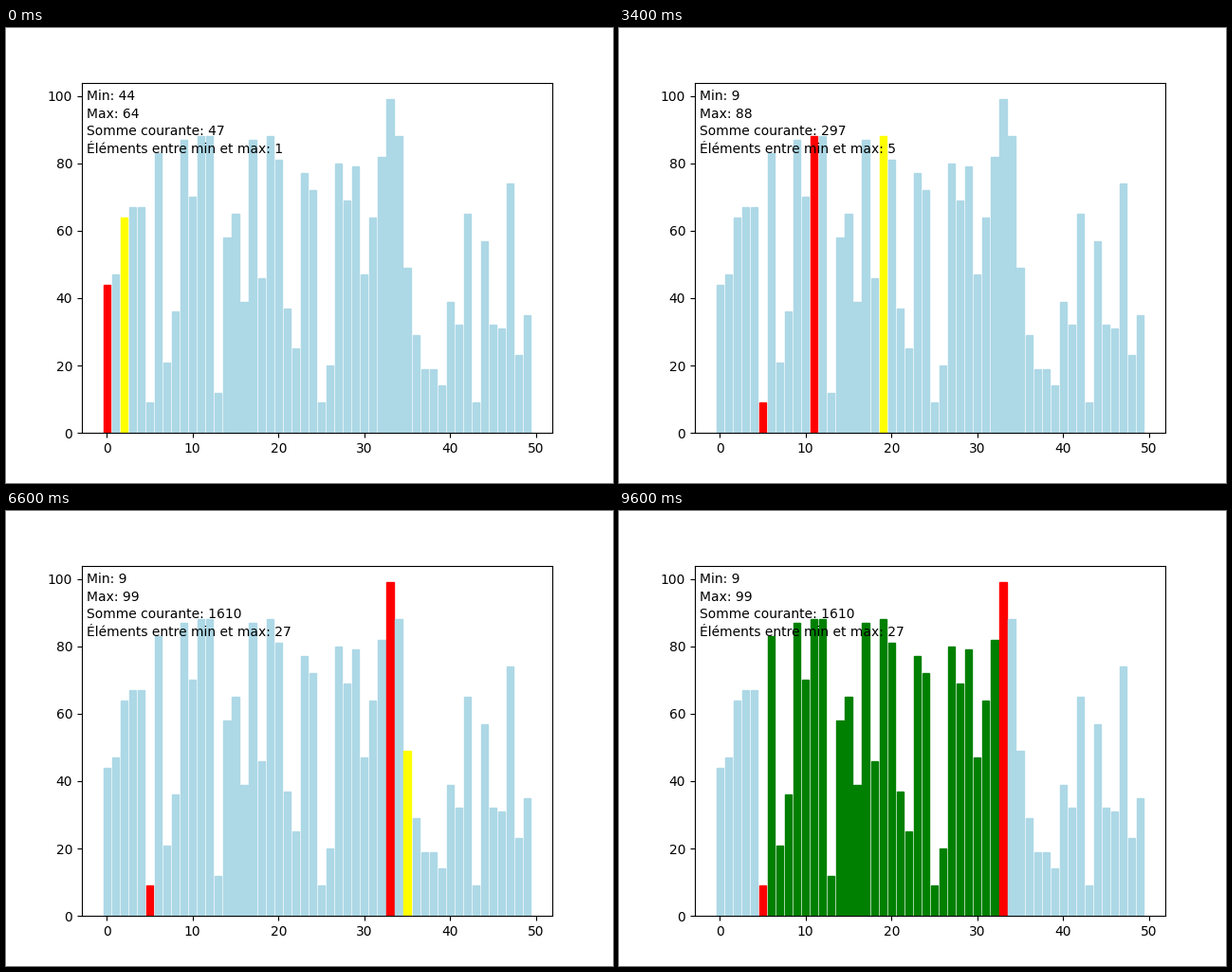
A matplotlib script that plays this animation: 640x480 px, repeating every 9.8 s.

```python
import numpy as np
import matplotlib.pyplot as plt
from matplotlib.animation import FuncAnimation

COUNT = 50
FIRST = 2  # index scanned when the loop starts
INTERVAL = 200

np.random.seed(0)
values = np.random.randint(0, 100, COUNT)

fig, ax = plt.subplots(figsize=(6.4, 4.8), dpi=100)
bars = ax.bar(range(COUNT), values, color="lightblue")
lines = [ax.text(0.01, y, "", transform=ax.transAxes)
         for y in (0.95, 0.90, 0.85, 0.80)]


def update(frame):
    scan = frame + FIRST
    done = scan >= COUNT
    seen = values[:scan + 1]
    low, high = int(np.argmin(seen)), int(np.argmax(seen))
    start, end = sorted((low, high))
    between = values[start + 1:end]

    colors = ["lightblue"] * COUNT
    if done:
        colors[start + 1:end] = ["green"] * len(between)
    colors[low] = colors[high] = "red"
    if not done:
        colors[scan] = "yellow"
    # set_color also paints the bar outline
    for bar, color in zip(bars, colors):
        bar.set_color(color)

    labels = (
        f"Min: {values[low]}",
        f"Max: {values[high]}",
        f"Somme courante: {between.sum()}",
        f"Éléments entre min et max: {len(between)}",
    )
    for line, label in zip(lines, labels):
        line.set_text(label)
    return [*bars, *lines]


anim = FuncAnimation(fig, update, frames=COUNT - FIRST + 1,
                     interval=INTERVAL, repeat=True, blit=False)
plt.show()
```
